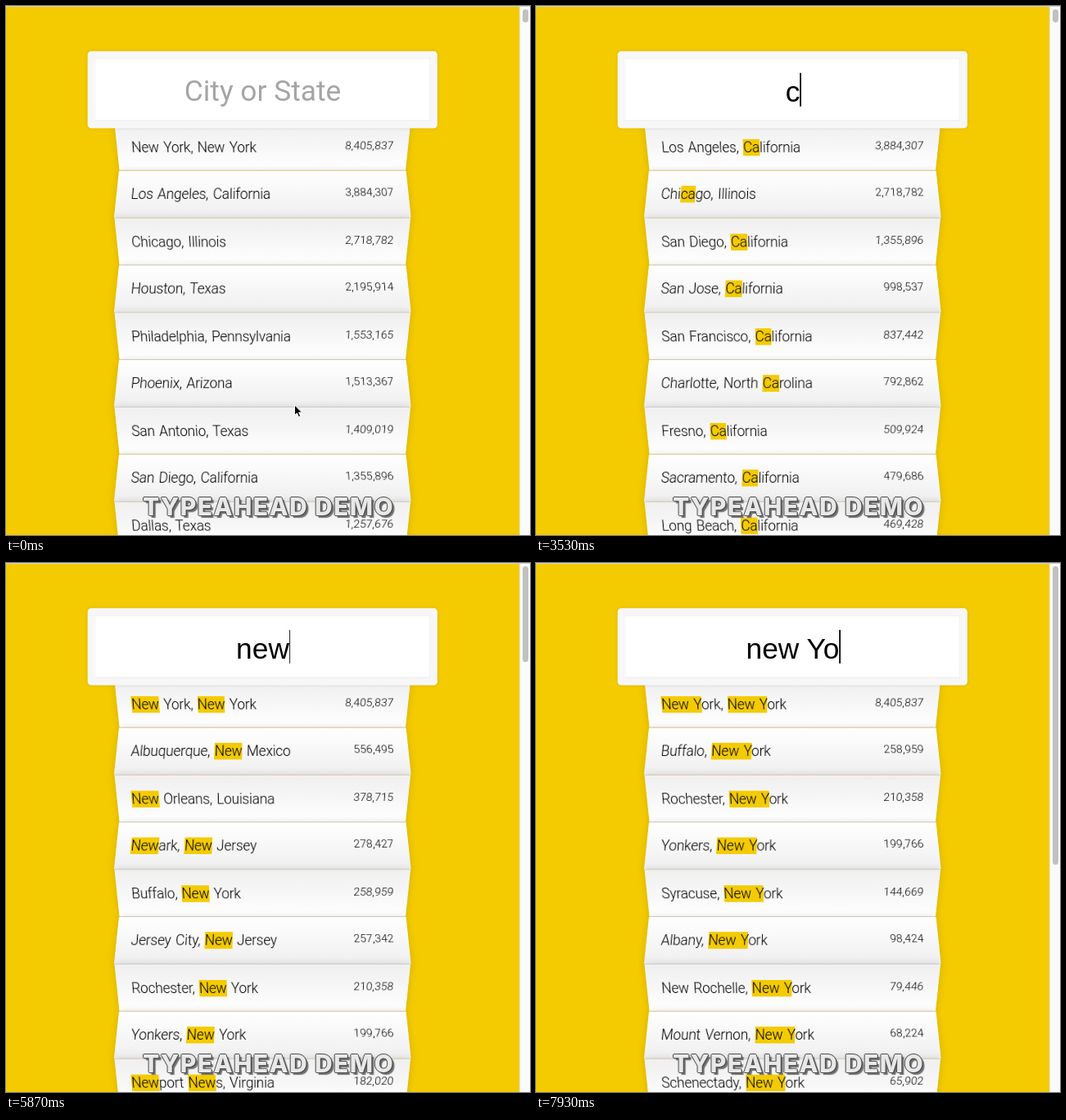
Recreate the animation shown at these times as an HTML page. Size 640 px wide and 647 px high, loop 8000 ms.

```html
<!DOCTYPE html>
<html lang="en">
<head>
<meta charset="utf-8">
<title>Typeahead demo</title>
<style>
  html, body { margin: 0; width: 100%; height: 100%; overflow: hidden; background: #f4cb00; }
  #stage { position: absolute; left: 0; top: 0; width: 640px; height: 647px; overflow: hidden; }
  #stage::before { content: ""; position: absolute; left: 0; top: 0; width: 640px; height: 1px; background: #d2d2d2; z-index: 4; }

  /* The page is laid out at full size and shown at 89 %. */
  #page { position: absolute; left: 0; top: 0; width: 704.5px; height: 727px; transform: scale(.89); transform-origin: 0 0; }

  .search {
    position: absolute; left: 112.25px; top: 61.8px; width: 480px; height: 106.7px; box-sizing: border-box; z-index: 2;
    display: flex; align-items: center; justify-content: center;
    border: 10px solid #f7f7f7; border-radius: 5px; background: #fff;
    box-shadow: 0 0 5px rgba(0, 0, 0, .12), inset 0 0 2px rgba(0, 0, 0, .19);
    font: 39.7px/46px "Liberation Sans", Arial, sans-serif; color: #000; white-space: pre;
  }
  .search span { position: relative; top: 2px; }
  #hint { position: absolute !important; left: 0; right: 0; top: 22px !important; text-align: center; font-family: Roboto, sans-serif; color: #a5a5a5; }
  .entry { position: relative; height: 46px; }
  #caret { position: absolute; right: -1.6px; top: 0; width: 1.6px; height: 46px; background: #000; }

  ul { position: absolute; left: 152.25px; top: 158.5px; width: 400px; margin: 0; padding: 0; }
  li {
    display: flex; justify-content: space-between; list-style: none; box-sizing: border-box; height: 65px; padding: 20px;
    border-bottom: 1px solid #d8d8d8; box-shadow: 0 0 10px rgba(0, 0, 0, .14);
    font: 300 19.4px/26.6px Roboto, sans-serif; letter-spacing: -.22px; word-spacing: 1.6px; color: #000; white-space: pre;
  }
  li:nth-child(even) { transform: perspective(100px) rotateX(3deg) translateY(2px) scale(1.001); background: linear-gradient(to bottom, #fff, #f0eff0); }
  li:nth-child(odd) { transform: perspective(100px) rotateX(-3deg) translateY(3px); background: linear-gradient(to top, #fff, #f0eff0); }
  mark { background: #f4cb00; color: inherit; }
  .population { font-size: 15.3px; line-height: 21px; letter-spacing: .15px; }

  #track { position: absolute; right: 0; top: 0; width: 12px; height: 647px; background: #fafafa; border-left: 1px solid #e4e4e4; }
  #thumb { position: absolute; left: 3px; top: 4px; width: 7px; border-radius: 4px; background: #c1c1c1; }

  .caption {
    --edge: #4c4c4c;
    position: absolute; left: 0; top: 595px; width: 641px; text-align: center; z-index: 5;
    font: 800 30px/35px Inter, sans-serif; letter-spacing: 1.4px; color: #e8e8e8; white-space: nowrap;
    text-shadow: 1px 0 var(--edge), -1px 0 var(--edge), 0 1px var(--edge), 0 -1px var(--edge),
      1px 1px var(--edge), 3px 3px 1px rgba(70, 70, 70, .75);
  }
  #pointer { position: absolute; left: 0; top: 0; width: 24px; height: 24px; overflow: visible; z-index: 6; }
</style>
</head>
<body>
<div id="stage">
  <div id="page">
    <div class="search"><span id="hint">City or State</span><div class="entry"><span id="typed"></span><i id="caret"></i></div></div>
    <ul id="list"></ul>
  </div>
  <div id="track"><div id="thumb"></div></div>
  <div class="caption">TYPEAHEAD DEMO</div>
  <svg id="pointer">
    <path id="arrow" d="M0 0V12.5L2.9 9.9L5 14.6L7.2 13.6L5.1 9.1H9Z" fill="#000" stroke="#fff" stroke-width="1"/>
    <path id="beam" d="M-3-7.5Q0-7.5 0-5Q0-7.5 3-7.5M0-5V5M-3 7.5Q0 7.5 0 5Q0 7.5 3 7.5M-1.8 2H1.8" fill="none" stroke="#111" stroke-width="1.3"/>
  </svg>
</div>
<script>
const LOOP = 8000, RESULT_LAG = 110, VISIBLE_ROWS = 9;
const FOCUS = 1750;

// Ordered by population.
const places = `New York, New York|8,405,837
Los Angeles, California|3,884,307
Chicago, Illinois|2,718,782
Houston, Texas|2,195,914
Philadelphia, Pennsylvania|1,553,165
Phoenix, Arizona|1,513,367
San Antonio, Texas|1,409,019
San Diego, California|1,355,896
Dallas, Texas|1,257,676
San Jose, California|998,537
Jacksonville, Florida|842,583
San Francisco, California|837,442
Columbus, Ohio|822,553
Charlotte, North Carolina|792,862
Detroit, Michigan|688,701
Memphis, Tennessee|653,450
Nashville, Tennessee|634,464
Las Vegas, Nevada|603,488
Albuquerque, New Mexico|556,495
Fresno, California|509,924
Sacramento, California|479,686
Long Beach, California|469,428
Omaha, Nebraska|434,353
Minneapolis, Minnesota|400,070
New Orleans, Louisiana|378,715
Newark, New Jersey|278,427
Buffalo, New York|258,959
Jersey City, New Jersey|257,342
Rochester, New York|210,358
Yonkers, New York|199,766
Newport News, Virginia|182,020
Paterson, New Jersey|145,948
Syracuse, New York|144,669
Albany, New York|98,424
New Rochelle, New York|79,446
Mount Vernon, New York|68,224
Schenectady, New York|65,902`.split('\n').map(line => line.split('|'));

const keys = [
  [0, ''], [2050, 'c'], [2280, 'ca'], [3490, 'c'], [3900, ''],
  [5380, 'n'], [5520, 'ne'], [5660, 'new'], [6500, 'new '], [7400, 'new Y'], [7890, 'new Yo']
];
const thumbHeights = { ne: 28, new: 117, 'new ': 129, 'new Y': 365 };

const $ = id => document.getElementById(id);
const [hint, typed, caret, list, thumb, pointer, arrow, beam] =
  ['hint', 'typed', 'caret', 'list', 'thumb', 'pointer', 'arrow', 'beam'].map($);
const show = (el, on) => { el.style.visibility = on ? 'visible' : 'hidden'; };
const keyAt = time => keys.filter(([at]) => at <= Math.max(0, time)).pop();

let shownQuery = null;
function renderList(query) {
  if (query === shownQuery) return;
  shownQuery = query;
  const pattern = new RegExp(query, 'gi');
  list.innerHTML = places
    .filter(([name]) => name.toLowerCase().includes(query.toLowerCase()))
    .slice(0, VISIBLE_ROWS)
    .map(([name, population]) => {
      const label = query ? name.replace(pattern, '<mark>$&</mark>') : name;
      return `<li><span>${label}</span><span class="population">${population}</span></li>`;
    }).join('');
  thumb.style.height = (thumbHeights[query] || 16) + 'px';
}

function renderPointer(time) {
  const p = Math.min(1, Math.max(0, (time - 700) / 700));
  const y = 488 + (128.5 - 488) * p * p * (3 - 2 * p);
  const visible = time < keys[1][0];
  const overInput = y < 150;
  pointer.style.transform = `translate(352.5px, ${y}px)`;
  show(arrow, visible && !overInput);
  show(beam, visible && overInput);
}

function render(time) {
  const [pressed, text] = keyAt(time);
  typed.textContent = text;
  show(hint, !text);
  const sinceKey = time - Math.max(pressed, FOCUS);
  show(caret, sinceKey >= 0 && sinceKey % 1000 < 500);
  renderList(keyAt(time - RESULT_LAG)[1]);
  renderPointer(time);
}

const start = performance.now();
function tick() {
  render((performance.now() - start) % LOOP);
  requestAnimationFrame(tick);
}
tick();
</script>
</body>
</html>
```
